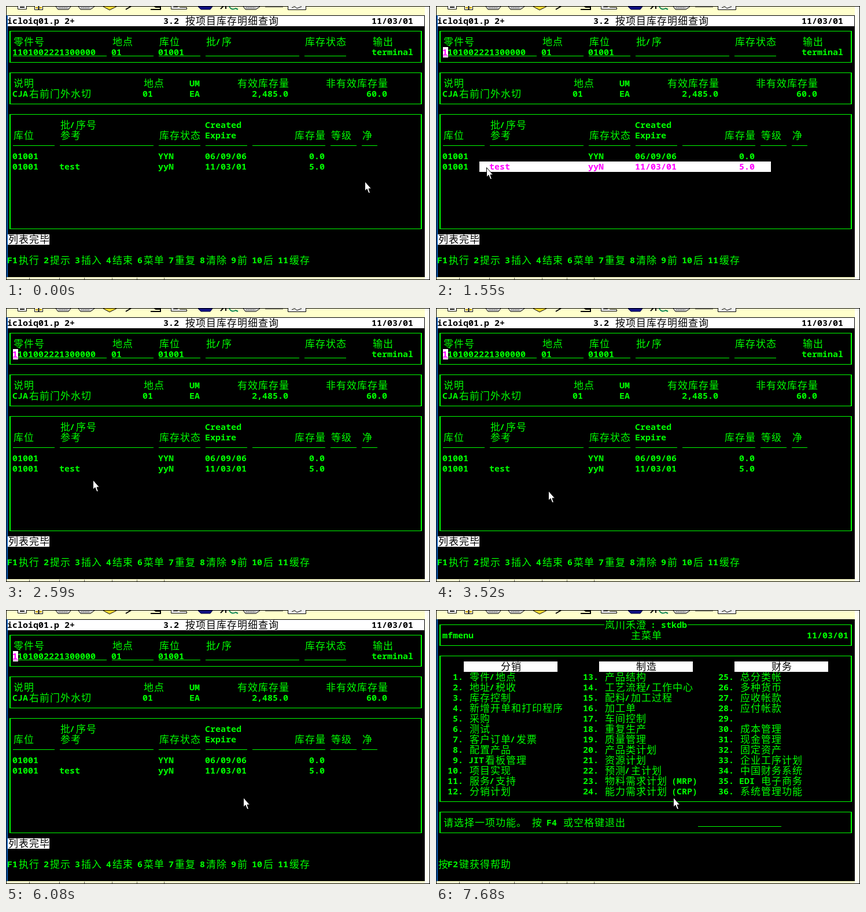
These frames come from a looping animation (733 by 474 pixels, 8 s). An HTML page:

```html
<!DOCTYPE html>
<html lang="zh">
<head>
<meta charset="utf-8">
<title>Terminal</title>
<style>
html, body { margin: 0; width: 100%; height: 100%; overflow: hidden; background: #000; }
svg { display: block; width: 733px; height: 474px; }
text { font: bold 15px "Noto Sans Mono", "DejaVu Sans Mono", monospace; white-space: pre; }
text.han { font: 17px "Noto Sans CJK SC", "Noto Sans CJK", sans-serif; letter-spacing: 1px; }
.invert { fill: #fff; mix-blend-mode: difference; }
</style>
</head>
<body>
<svg id="stage" viewBox="0 0 733 474">
  <rect width="733" height="474"/>
  <g shape-rendering="crispEdges">
    <rect x="1" y="1" width="731" height="15" fill="#ffffcc"/>
    <rect x="1" y="469" width="731" height="4" fill="#ffffcc"/>
    <rect x="724" y="1" width="8" height="472" fill="#fffff4"/>
    <rect x="1" y="16" width="2" height="453" fill="#0a5cb8"/>
    <path d="M40 470v3M92 470v3M135 470v3M183 470v3M226 470v3M273 470v3" stroke="#555"/>
  </g>
  <g stroke="#000" fill="#fff">
    <path d="M20.500 0V5.500H35.500V0M49.500 0V6.500H63.500V0"/>
    <path d="M24 2h8M56.500 0V6" stroke-width="2"/>
    <path d="M51 3h4M58 3h4" stroke="#ca0" stroke-width="3"/>
    <path d="M86 1l4 5h18l4-5M125 1l4 5h17l7-5M410 1l4 5h18l7-5" fill="#ccc"/>
    <path d="M91 3h16M130 3h15M415 3h16" stroke="#444" stroke-dasharray="2 1"/>
    <path d="M168 1l11 6 12-6" fill="#fd3"/>
    <path d="M217 0l-10 6M250 6h17v-4h-8l-3-2" fill="none" stroke-width="2"/>
    <path d="M285.500 0V5.500H312.500V2.500H300M289 2h8"/>
    <path d="M332 1l5 5h16l4-5z" fill="#118" stroke="#003"/>
    <path d="M371 5l5-5M380 0v5" stroke-width="2"/>
    <path d="M386 1q4 7 11 3l4 2" fill="none" stroke="#185" stroke-width="2"/>
    <path d="M448 2h31" stroke="#555"/>
    <path d="M487.500 0V6.500H518.500V0M494 3l5-2 4 3 8-3" fill="#eee"/>
  </g>
  <g id="query"></g>
  <g id="menu"></g>
  <rect id="selection" class="invert" y="269" height="18"/>
  <rect id="caret" class="invert" width="9" height="18"/>
  <path id="pointer" d="M-.5 .5V17L3 13.500L5.800 20.500H8.500L6 13H10.500Z" fill="#fff" stroke="#000"/>
</svg>
<script>
const LOOP = 8000, TICK = 103.3, CELL = 9, LINE = 18;
const $ = id => document.getElementById(id);
const colX = col => 3 + col * CELL;
const rowY = row => 17 + row * LINE;

function add(parent, tag, attrs, content = '') {
  const node = document.createElementNS('http://www.w3.org/2000/svg', tag);
  for (const key in attrs) node.setAttribute(key, attrs[key]);
  node.textContent = content;
  return parent.appendChild(node);
}

const rect = (g, x, y, width, height, fill = '#0f0') => add(g, 'rect', { x, y, width, height, fill });
const bar = (g, row, col, cols, fill = '#fff') => rect(g, colX(col), rowY(row), cols * CELL, LINE, fill);
const rule = (g, row, col, cols, dy) => rect(g, colX(col), rowY(row) + dy, cols * CELL, 1);

// Han characters take two cells, all others one.
function put(g, row, col, str, fill = '#0f0') {
  for (const run of str.match(/[\u3000-\uffff]+|[^\u3000-\uffff]+/g) || []) {
    const han = run.charCodeAt(0) >= 0x3000;
    const x = colX(col) + (han ? 1 : -1), y = rowY(row) + (han ? 15 : 14);
    add(g, 'text', { x, y, fill, class: han ? 'han' : 'latin' }, run);
    col += run.length * (han ? 2 : 1);
  }
}

function putAll(g, rows) {
  for (const row in rows)
    for (const col in rows[row]) put(g, +row, +col, rows[row][col]);
}

const FRAME_LEFT = colX(0) + 3, FRAME_RIGHT = colX(79) + 3;
const across = (g, y) => rect(g, FRAME_LEFT, y, FRAME_RIGHT - FRAME_LEFT + 2, 1);
const down = (g, x, y, h) => rect(g, x, y, 2, h);

function box(g, top, bottom) {
  const y = rowY(top) + 8, h = (bottom - top) * LINE;
  across(g, y);
  across(g, y + h);
  down(g, FRAME_LEFT, y, h);
  down(g, FRAME_RIGHT, y, h);
}

function buildQuery(g) {
  bar(g, 0, 0, 80);
  put(g, 0, 0, 'icloiq01.p 2+', '#000');
  put(g, 0, 30, '3.2 按项目库存明细查询', '#000');
  put(g, 0, 70, '11/03/01', '#000');
  box(g, 1, 4);
  box(g, 5, 8);
  box(g, 9, 20);
  for (const [col, cols] of [[1, 18], [20, 8], [29, 8], [38, 18], [57, 8]]) rule(g, 3, col, cols, 15);
  for (const [col, cols] of [[1, 8], [10, 18], [29, 8], [38, 8], [47, 14], [62, 5], [68, 3]]) rule(g, 12, col, cols, 8);
  putAll(g, {
    2: { 1: '零件号', 20: '地点', 29: '库位', 38: '批/序', 57: '库存状态', 70: '输出' },
    3: { 1: '1101002221300000', 20: '01', 29: '01001', 70: 'terminal' },
    6: { 1: '说明', 26: '地点', 35: 'UM', 44: '有效库存量', 61: '非有效库存量' },
    7: { 1: 'CJA右前门外水切', 26: '01', 35: 'EA', 47: '2,485.0', 69: '60.0' },
    10: { 10: '批/序号', 38: 'Created' },
    11: { 1: '库位', 10: '参考', 29: '库存状态', 38: 'Expire', 55: '库存量', 62: '等级', 68: '净' },
    13: { 1: '01001', 29: 'YYN', 38: '06/09/06', 58: '0.0' },
    14: { 1: '01001', 10: 'test', 29: 'yyN', 38: '11/03/01', 58: '5.0' },
    23: { 0: 'F1执行 2提示 3插入 4结束 6菜单 7重复 8清除 9前 10后 11缓存' }
  });
  bar(g, 21, 0, 8);
  put(g, 21, 0, '列表完毕', '#000');
}

const MENUS = [
  ['分销', '零件/地点,地址/税收,库存控制,新增开单和打印程序,采购,测试,客户订单/发票,配置产品,JIT看板管理,项目实现,服务/支持,分销计划'],
  ['制造', '产品结构,工艺流程/工作中心,配料/加工过程,加工单,车间控制,重复生产,质量管理,产品类计划,资源计划,预测/主计划,物料需求计划 (MRP),能力需求计划 (CRP)'],
  ['财务', '总分类帐,多种货币,应收帐款,应付帐款,,成本管理,现金管理,固定资产,企业工序计划,中国财务系统,EDI 电子商务,系统管理功能']
];

function buildMenu(g) {
  const partial = add(g, 'g', {}), rest = add(g, 'g', {});
  box(g, 0, 2);
  bar(g, 0, 32, 16, '#000');
  putAll(g, {
    0: { 32: '岚川禾澄 : stkdb' },
    1: { 1: 'mfmenu', 37: '主菜单', 71: '11/03/01' }
  });
  MENUS.forEach(([title, items], m) => {
    const left = 2 + m * 26;
    bar(g, 4, left + 3, 18);
    put(g, 4, left + 10, title, '#000');
    items.split(',').forEach((item, i) => {
      const layer = m && i === 11 ? rest : g;
      put(layer, 5 + i, left, String(m * 12 + i + 1).padStart(2) + '.');
      put(layer, 5 + i, left + 4, item);
    });
  });

  // The lower edge of the list is still being painted at first.
  const top = rowY(3) + 8;
  across(partial, top);
  down(partial, FRAME_LEFT, top, rowY(17) - top);
  down(partial, FRAME_RIGHT, top, rowY(16) - top);
  put(partial, 23, 0, 'Compiling /new/xxprhisc2.p');

  box(rest, 3, 17);
  box(rest, 18, 20);
  put(rest, 19, 1, '请选择一项功能。 按 F4 或空格键退出');
  rule(rest, 19, 50, 16, 15);
  put(rest, 23, 0, '按F2键获得帮助');
  return { partial, rest };
}

const PATH = [
  [0, 621, 303], [410, 559, 279], [640, 559, 279], [720, 500, 279], [929, 316, 279],
  [1240, 130, 279], [1445, 80, 279], [1549, 88, 279], [2060, 131, 279], [2200, 131, 279],
  [2580, 151, 297], [2720, 151, 297], [3510, 195, 316], [3650, 195, 316], [4235, 411, 324]
];
const MENU_AT = 6510, REST_AT = 6610;
const SELECT_FROM = 300, SELECT_HOLD = 1445, SELECT_TO = 2280, SELECT_RIGHT = 579;
const BLINKS = [200, 720, 1240, 1760, 2280, 2800, 3310, 3830, 4040, 4460, 5000, 5540, 6080, MENU_AT,
  REST_AT, 6710, 7250, 7680];

function pointerAt(time) {
  const t = Math.floor(time / TICK) * TICK;
  const next = PATH.findIndex(p => p[0] > t);
  if (next < 0) return PATH[PATH.length - 1].slice(1);
  const a = PATH[next - 1], b = PATH[next], k = (t - a[0]) / (b[0] - a[0]);
  return [1, 2].map(i => Math.round(a[i] + (b[i] - a[i]) * k));
}

const show = (node, on) => node.setAttribute('display', on ? 'inline' : 'none');

buildQuery($('query'));
const { partial, rest } = buildMenu($('menu'));

function render(t) {
  const inMenu = t >= MENU_AT, ready = t >= REST_AT;
  show($('query'), !inMenu);
  show($('menu'), inMenu);
  show(partial, !ready);
  show(rest, ready);

  const [x, y] = pointerAt(t);
  $('pointer').setAttribute('transform', `translate(${x} ${y})`);

  const [tip] = pointerAt(Math.min(t, SELECT_HOLD + TICK / 2));
  const left = colX(Math.floor((tip - 3) / CELL));
  $('selection').setAttribute('x', left);
  $('selection').setAttribute('width', Math.max(0, SELECT_RIGHT - left));
  show($('selection'), t >= SELECT_FROM && t < SELECT_TO);

  $('caret').setAttribute('x', colX(inMenu ? 50 : 1));
  $('caret').setAttribute('y', rowY(inMenu ? 19 : 3));
  show($('caret'), BLINKS.filter(b => b <= t).length % 2);
}

const start = performance.now();
function frame() {
  render((performance.now() - start) % LOOP);
  requestAnimationFrame(frame);
}
frame();
</script>
</body>
</html>
```
